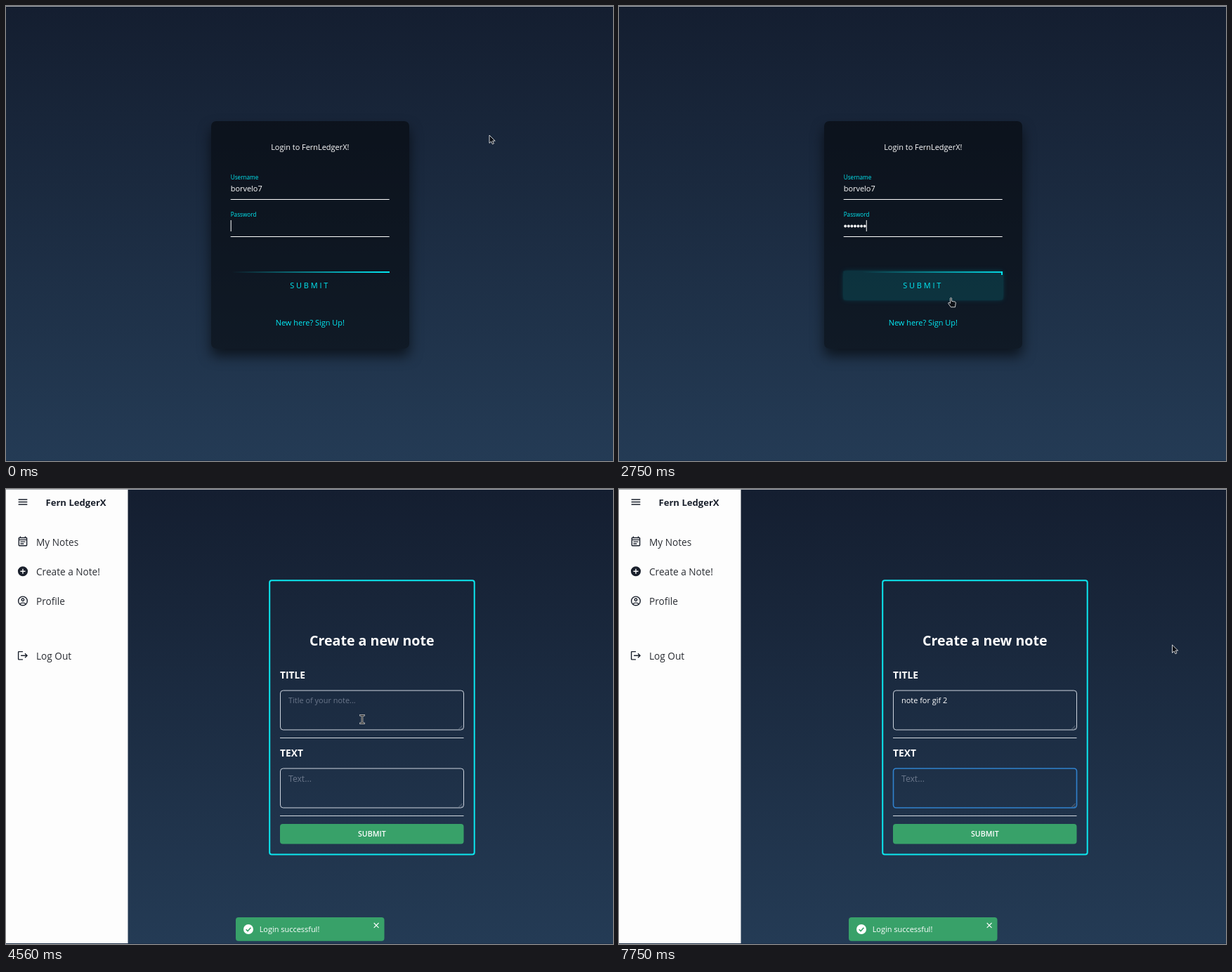
These frames come from a looping animation (864 px wide and 648 px high, 8 s). An HTML page:

```html
<!DOCTYPE html>
<html lang="en">
<head>
<meta charset="utf-8">
<title>Login and create a note</title>
<style>
html, body { margin: 0; width: 100%; height: 100%; overflow: hidden; }
body { background: #141e30; }
#stage { position: relative; width: 864px; height: 648px; overflow: hidden; background: linear-gradient(#141e30, #243b55); }
#stage::after { content: ""; position: absolute; inset: 0; border-top: 1px solid #a3a7ad; border-bottom: 1px solid #1d3049; }
#login, #app, svg { position: absolute; left: 0; top: 0; width: 864px; height: 648px; }
#card { position: absolute; left: 291.5px; top: 164px; width: 282px; height: 323.5px; border-radius: 7px;
  background: rgba(0,0,0,.5); box-shadow: 0 10.5px 17.6px rgba(0,0,0,.6); }
#btn, #bars { position: absolute; left: 319.6px; top: 378px; width: 226px; height: 40px; }
#bars { overflow: hidden; }
#bars i { position: absolute; }
#bars i:nth-child(odd) { width: 100%; height: 1.5px; }
#bars i:nth-child(even) { width: 1.5px; height: 100%; }
#bars i:nth-child(1) { top: 0; background: linear-gradient(90deg, transparent, #03e9f4); }
#bars i:nth-child(2) { right: 0; background: linear-gradient(180deg, transparent, #03e9f4); }
#bars i:nth-child(3) { bottom: 0; background: linear-gradient(270deg, transparent, #03e9f4); }
#bars i:nth-child(4) { left: 0; background: linear-gradient(0deg, transparent, #03e9f4); }
text { font: 10.95px "Open Sans", "Noto Sans", sans-serif; fill: #fff; white-space: pre; }
.cy { fill: #03e9f4; }
.small { font-size: 8.2px; }
.mid { text-anchor: middle; }
.nav { font-size: 13.65px; fill: #2a2d33; }
.label { font-size: 13.8px; font-weight: 700; }
.hint { fill: #6b778b; }
.rule { stroke: #d3d9e0; }
.caret { stroke: #fff; }
.area { fill: none; }
</style>
</head>
<body>
<div id="stage">
  <div id="login">
    <div id="card"></div>
    <div id="btn"></div>
    <div id="bars"><i></i><i></i><i></i><i></i></div>
    <svg>
      <text class="mid" x="432.8" y="205">Login to FernLedgerX!</text>
      <text class="cy small" x="319.7" y="247">Username</text>
      <text x="319.7" y="264">borvelo7</text>
      <text class="cy small" x="319.7" y="300">Password</text>
      <path stroke="#fff" d="M319.7 275.5h226M319.7 328.5h226"/>
      <g id="dots" fill="#fff"></g>
      <path id="passCaret" class="caret" d="M.5 305v16"/>
      <text class="cy" x="404.2" y="402" letter-spacing="2.82">SUBMIT</text>
      <text class="cy mid" x="432.8" y="455">New here? Sign Up!</text>
    </svg>
  </div>
  <div id="app">
    <svg>
      <rect width="173.5" height="648" fill="#fdfdfd"/>
      <g id="icons" fill="#1a202c">
        <path d="M3 18h18v-2H3zm0-5h18v-2H3zm0-7v2h18V6z" transform="translate(15.5 10) scale(.705)"/>
        <path fill-rule="evenodd" d="M19 4h-1V2h-2v2H8V2H6v2H5a2 2 0 0 0-2 2v14a2 2 0 0 0 2 2h14a2 2 0 0 0 2-2V6a2 2 0 0 0-2-2zm0 16H5V10h14zm0-12H5V6h14zM17 12H7v2h10zM14 16H7v2h7z" transform="translate(15.5 66) scale(.705)"/>
        <path fill-rule="evenodd" d="M12 2a10 10 0 1 0 0 20a10 10 0 1 0 0-20zm5 11h-4v4h-2v-4H7v-2h4V7h2v4h4z" transform="translate(15.5 108.8) scale(.705)"/>
        <g fill="none" stroke="#1a202c" stroke-width="2" transform="translate(15.5 151) scale(.705)">
          <circle cx="12" cy="12" r="9"/><circle cx="12" cy="9.5" r="2.5"/><path d="M6 18c3-3 9-3 12 0"/>
        </g>
        <path d="M17 7l-1.4 1.4L18.2 11H8v2h10.2l-2.6 2.6L17 17l5-5zM4 5h8V3H4a2 2 0 0 0-2 2v14a2 2 0 0 0 2 2h8v-2H4z" transform="translate(15.5 228.8) scale(.705)"/>
      </g>
      <text x="56.5" y="24" style="font-size:13.1px;font-weight:700;fill:#1a202c">Fern LedgerX</text>
      <text class="nav" x="43" y="81">My Notes</text>
      <text class="nav" x="43" y="123">Create a Note!</text>
      <text class="nav" x="43" y="165">Profile</text>
      <text class="nav" x="43" y="243">Log Out</text>

      <rect x="375.2" y="130.2" width="291.5" height="390.3" rx="3" fill="none" stroke="#0ce8f0" stroke-width="2"/>
      <text class="mid" x="520.8" y="223" style="font-size:19.6px;font-weight:700">Create a new note</text>
      <text class="label" x="390" y="269.5">TITLE</text>
      <text class="label" x="390" y="380.5">TEXT</text>
      <rect id="titleBox" class="area" x="390.5" y="287" width="261" height="56" rx="4"/>
      <rect id="textBox" class="area" x="390.5" y="398" width="261" height="56" rx="4"/>
      <path stroke="#8a94a3" stroke-width=".7" d="M644.5 342l5-5M647.5 342l2-2M644.5 453l5-5M647.5 453l2-2"/>
      <path class="rule" d="M390 354.5h261.5M390 465.5h261.5"/>
      <text id="titleHint" class="hint" x="402" y="305">Title of your note...</text>
      <text id="title" x="402" y="305"></text>
      <path id="titleCaret" class="caret" d="M.5 293v15"/>
      <text class="hint" x="402" y="417" style="font-size:12.2px">Text...</text>
      <path id="textCaret" class="caret" d="M402.5 404v17"/>
      <rect x="390" y="477" width="261.5" height="28.5" rx="4" fill="#38a169"/>
      <text class="mid" x="520.8" y="495.3" style="font-size:10.6px;font-weight:600">SUBMIT</text>

      <g id="toast">
        <rect x="327" y="610" width="211.5" height="33.7" rx="4" fill="#38a169"/>
        <circle cx="345" cy="627" r="7" fill="#fff"/>
        <path d="M341.7 627.2l2.4 2.4 4.3-4.9" fill="none" stroke="#38a169" stroke-width="1.6"/>
        <text x="360.7" y="631">Login successful!</text>
        <path d="M523.7 618l6.8 6.8M530.5 618l-6.8 6.8" stroke="#fff" stroke-width="1.1"/>
      </g>
    </svg>
  </div>
  <svg>
    <g id="cursor">
      <path id="arrow" d="M0 0v11.3l2.6-2.4 1.8 3.8 2-.9-1.8-3.7h3.6z" fill="#0b0f16" stroke="#fff" stroke-width=".8"/>
      <g id="beam" fill="none">
        <path d="M-3.7-5.7h7.4M0-5.7V5.7M-3.7 5.7h7.4" stroke="#d8d8d8" stroke-width="2.6"/>
        <path d="M-3-5.7h6M0-5.7V5.7M-3 5.7h6" stroke="#111" stroke-width="1.1"/>
      </g>
      <path id="hand" d="M-1 .8Q0-.6 1 .8V5l5 1q1 .4 .8 1.600L6 13.500H0L-3.800 8.300q0-1.600 1.500-1L-1 8.200z" fill="#0b0f16" stroke="#fff" stroke-width=".8"/>
    </g>
  </svg>
</div>
<script>
const LOOP = 8000, BLINK = 525, SUBMIT = 3160, BLANK = 3310, APP = 3420, CLICK = 4605, TAB = 7210;
const NOTE = "note for gif 2";
const noteTimes = [...NOTE].map((c, i) => i < 9 ? 6070 + 70 * i : [6740, 6780, 6890, 6975, 7060][i - 9]);
const passTimes = [...Array(7)].map((c, i) => 70 + 80 * i);

const mouse = [
  [0, 688, 184], [880, 688, 184], [1100, 696, 177], [1400, 680, 182], [1680, 605, 199],
  [1990, 507, 264], [2520, 507, 258], [2640, 487, 370], [2750, 472.5, 415], [2840, 470, 442],
  [2950, 470, 438], [3060, 466, 400], [3160, 466, 391.5], [3420, 466, 391.5], [3650, 330, 370],
  [3880, 190, 475], [4140, 320, 428], [4250, 327, 270], [4400, 395, 172], [4540, 507, 328],
  [4640, 507, 328], [4820, 834, 245], [4940, 787.5, 222]
];
const glow = [[2630, 0], [2750, .13], [2780, .15], [2900, .03], [3010, .03], [SUBMIT, .18]];

const $ = id => document.getElementById(id);
const show = (id, on) => $(id).style.display = on ? "" : "none";
const clamp = v => Math.max(0, Math.min(1, v));
const count = (times, t) => times.filter(s => s <= t).length;
const blink = (t, start) => Math.floor((t - start) / BLINK) % 2 === 0;
const inside = (x, y, l, top, r, b) => x >= l && x <= r && y >= top && y <= b;

// Linear interpolation between rows of [time, ...values]
function along(rows, t) {
  const n = rows.findIndex(r => r[0] > t);
  if (n < 1) return rows.at(n).slice(1);
  const a = rows[n - 1], b = rows[n], k = (t - a[0]) / (b[0] - a[0]);
  return a.slice(1).map((v, i) => v + (b[i + 1] - v) * k);
}

$("dots").innerHTML = passTimes.map((c, i) => `<circle cx="${322.2 + 4.58 * i}" cy="313.5" r="1.9"/>`).join("");
const dots = [...$("dots").children], bars = [...$("bars").children];

function drawLogin(t) {
  const typed = count(passTimes, t);
  dots.forEach((d, i) => d.style.display = i < typed ? "" : "none");
  $("passCaret").setAttribute("transform", `translate(${319.7 + 4.58 * typed})`);
  show("passCaret", blink(Math.max(t, 550), 550));

  // A light runs round the button, a quarter turn apart on each side
  const phase = 1.25 + Math.min(t, SUBMIT) / 908;
  bars.forEach((bar, i) => {
    const p = (phase - i / 4) % 1;
    bar.style[["left", "top", "right", "bottom"][i]] = Math.min(100, 400 * p - 100) + "%";
  });

  const h = t < glow[0][0] ? 0 : along(glow, t)[0], color = `rgba(3,233,244,${h})`;
  $("btn").style.background = color;
  $("btn").style.borderRadius = 3.5 * h + "px";
  $("btn").style.boxShadow = [3.5, 17.6, 35, 70].map(b => `0 0 ${b * h}px ${color}`).join();
}

function drawFocus(id, k) {
  const mix = (a, b) => a + (b - a) * k;
  $(id).style.stroke = `rgb(${mix(205, 49)},${mix(212, 130)},${mix(222, 206)})`;
  $(id).style.strokeWidth = 1 + .6 * k;
}

function drawApp(t) {
  const typed = count(noteTimes, t), left = clamp((t - TAB) / 140);
  $("title").textContent = NOTE.slice(0, typed);
  show("titleHint", !typed);
  const end = typed ? $("title").getComputedTextLength() : 0;
  $("titleCaret").setAttribute("transform", `translate(${402 + end})`);
  show("titleCaret", t >= CLICK && t < TAB && (typed || blink(t, CLICK)));
  show("textCaret", t >= TAB && t < 7750);
  drawFocus("titleBox", clamp((t - CLICK) / 180) - left);
  drawFocus("textBox", left);

  const rest = (1 - clamp((t - APP - 60) / 380)) ** 3;
  $("toast").setAttribute("transform", `translate(0 ${24 * rest})`);
  $("toast").style.opacity = 1 - rest;
}

function drawCursor(t) {
  const [x, y] = along(mouse, t);
  const login = t < BLANK, app = t >= APP;
  const beam = login && (inside(x, y, 320, 250, 546, 276) || inside(x, y, 320, 303, 546, 329)) ||
    app && (inside(x, y, 390, 287, 652, 343) || inside(x, y, 390, 398, 652, 454));
  const hand = login && (inside(x, y, 320, 378, 546, 418) || inside(x, y, 384, 441, 482, 460));
  $("cursor").setAttribute("transform", `translate(${x} ${y})`);
  show("beam", beam);
  show("hand", hand);
  show("arrow", !beam && !hand);
}

function frame(now) {
  const t = now % LOOP;
  show("login", t < BLANK);
  show("app", t >= APP);
  if (t < BLANK) drawLogin(t);
  if (t >= APP) drawApp(t);
  drawCursor(t);
  requestAnimationFrame(frame);
}
frame(0);
</script>
</body>
</html>
```
